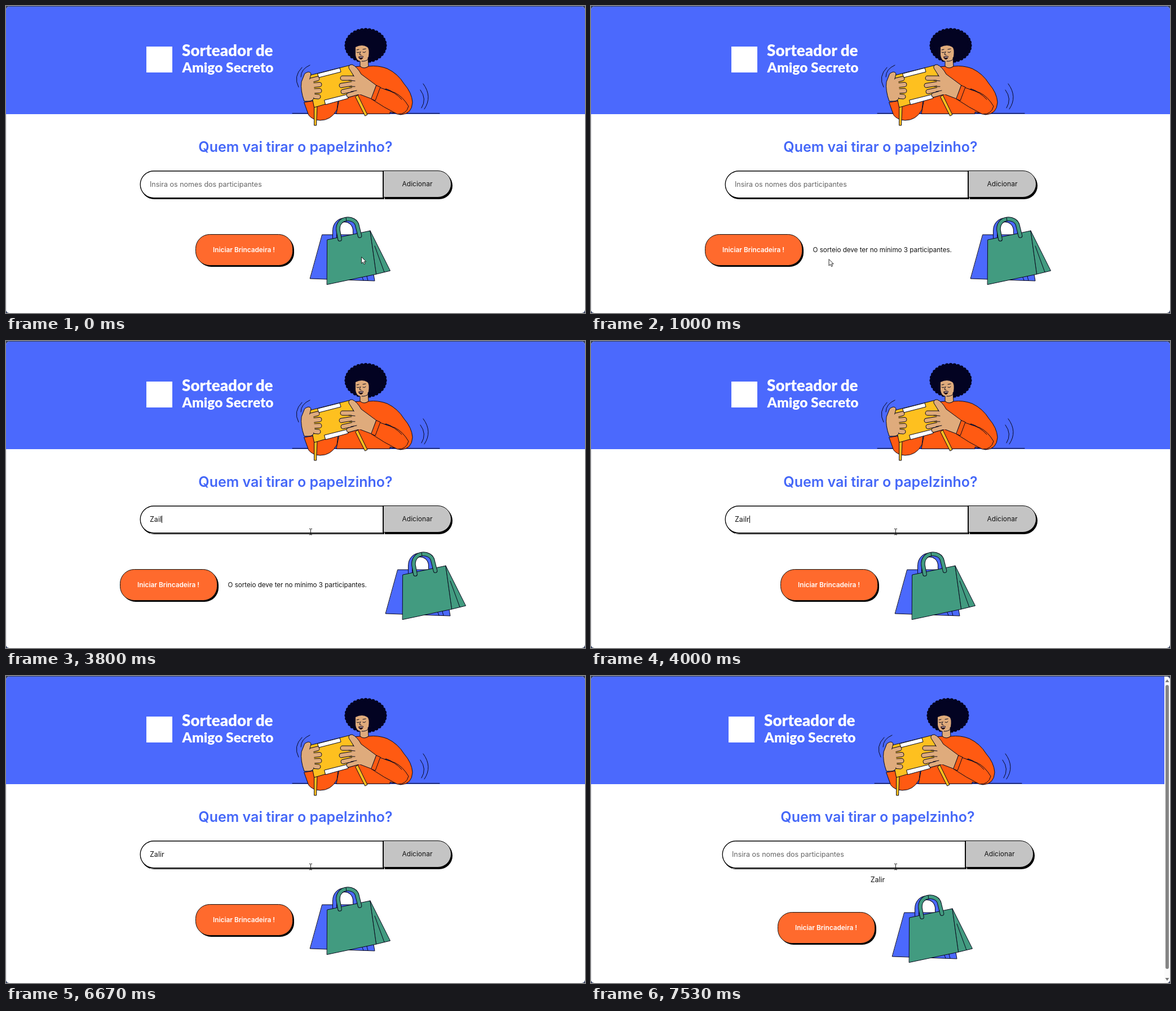
An HTML page that plays this animation: 1027 by 545 pixels, repeating every 8000 ms.

```html
<!DOCTYPE html>
<html lang="pt-BR">
<head>
<meta charset="utf-8">
<title>Sorteador</title>
<style>
  html, body { margin: 0; width: 100%; height: 100%; overflow: hidden; background: #34405f; }
  svg { display: block; width: 1027px; height: 545px; }
  text { font-family: Inter, sans-serif; white-space: pre; }
  .brand { font-family: Lato, sans-serif; font-weight: 900; fill: #fff; }
  .ink { stroke: #08081c; stroke-width: 1; stroke-linejoin: round; stroke-linecap: round; }
  .line { fill: none; }
  .skin { fill: #dfab7c; }
  .orange { fill: #ff5a12; }
  .yellow { fill: #fec01f; }
  .green { fill: #429b80; }
  .blue { fill: #4b69fd; }
  .white { fill: #fff; }
</style>
</head>
<body>
<svg viewBox="0 0 1027 545">
  <defs><clipPath id="window"><rect y="1" width="1027" height="544" rx="6"/></clipPath></defs>
  <g clip-path="url(#window)">
    <rect class="white" width="1027" height="545"/>
    <rect class="blue" width="1027" height="192"/>
    <rect y="192" width="1" height="353" fill="#e4e4e8"/>

    <g id="content">
      <rect class="white" x="249" y="72" width="46" height="46"/>
      <text class="brand" x="312" y="89" font-size="27.8">Sorteador de</text>
      <text class="brand" x="312.500" y="118" font-size="24.5">Amigo Secreto</text>

      <g id="woman"></g>

      <text x="513.5" y="259" text-anchor="middle" font-size="25" font-weight="600" fill="#4467f8">Quem vai tirar o papelzinho?</text>

      <path d="M671 295H263A24 24 0 0 0 263 343H671Z"/>
      <path id="focus" d="M255 341.500H669" stroke="#b5b5b5" stroke-width=".8"/>
      <path d="M669 293H262A23.800 23.800 0 0 0 262 340.600H669Z" fill="#fff" stroke="#000" stroke-width="1.300"/>
      <path d="M672 295H768A24 24 0 0 1 768 343H672Z"/>
      <path d="M669.500 292.500H766A23.500 23.500 0 0 1 766 339.500H669.500Z" fill="#c4c4c4" stroke="#000"/>
      <path d="M669 292.500V341.500" stroke="#000" stroke-width="1.600"/>
      <text x="729.500" y="320" text-anchor="middle" font-size="12" fill="#111">Adicionar</text>
      <text id="entry" x="255" y="320.500" font-size="12.5"></text>
      <rect id="caret" y="310" width="1" height="13" fill="#111"/>
      <text id="added" x="513.5" y="366" text-anchor="middle" font-size="12.5" fill="#111">Zalir</text>

      <g id="footer">
        <g id="start">
          <rect x="339" y="408" width="172" height="55" rx="25"/>
          <rect id="startFill" x="336.500" y="405.500" width="172" height="55" rx="25" stroke="#111"/>
          <text x="422" y="436.500" text-anchor="middle" font-size="11.8" font-weight="600" fill="#fff">Iniciar Brincadeira !</text>
        </g>
        <text id="warning" x="393.500" y="436.500" font-size="11.6" fill="#111">O sorteio deve ter no mínimo 3 participantes.</text>
        <g id="bags"></g>
      </g>
    </g>

    <g id="scrollbar">
      <rect x="1017" width="10" height="545" fill="#fafafa"/>
      <rect x="1019" y="16" width="6" height="504" rx="3" fill="#858585"/>
      <path d="M1018.500 11L1022 6L1025.500 11ZM1018.500 536L1022 541L1025.500 536Z" fill="#777"/>
    </g>

    <g id="cursor">
      <path id="arrow" d="M0 0V11.500L2.700 9L4.500 13L6.500 12.100L4.700 8.300H8.200Z" fill="#fff" stroke="#111" stroke-width=".9"/>
      <path id="hand" d="M-1 6V1Q0-1 1 1V5L6 6.500Q7.500 7 7 9L6 14H0L-4 9Q-4 7-2 8L-1 9Z" fill="#fff" stroke="#111" stroke-width=".9"/>
      <path id="beam" d="M-2.500-5H-.7L0-4.300L.7-5H2.500M0-4.300V4.800M-2.500 5.500H-.7L0 4.800L.7 5.500H2.500" fill="none" stroke="#111"/>
    </g>
  </g>
</svg>

<script>
const LOOP = 8000;
const $ = id => document.getElementById(id);
const shape = (d, fill) => `<path class="ink ${fill}" d="${d}"/>`;
const lines = d => shape(d, 'line');
// A rounded band with a dark outline on both sides.
const tube = (d, color, width) =>
  [['#08081c', width + 2], [color, width]].map(([stroke, w]) =>
    `<path d="${d}" fill="none" stroke="${stroke}" stroke-width="${w}" stroke-linecap="round" stroke-linejoin="round"/>`).join('');
const fingers = list => list.map(d => tube(d, '#dfab7c', 6.8)).join('');

function drawHair() {
  let curls = '<ellipse cx="638" cy="70" rx="35.5" ry="29"/>';
  const count = 32;
  for (let i = 0; i < count; i++) {
    const a = i / count * Math.PI * 2;
    curls += `<circle cx="${638 + 34 * Math.cos(a)}" cy="${70 + 27.5 * Math.sin(a)}" r="3.6"/>`;
  }
  return `<g fill="#030322">${curls}</g>`;
}

$('woman').innerHTML =
  lines('M508 190.500H769M525 109Q509 125 519 144M539 105Q523 112 523 126M735 149Q747 165 737 181M740 138Q757 161 742 183') +
  drawHair() +
  shape('M628 92V107Q634 114 643 107L642 92Z', 'skin') +
  shape('M586 191L592 160L612 110Q620 107 628 107Q635 113 643 107Q660 105 676 111Q695 120 706 138Q720 154 721 171Q720 192 700 193L681 188V191Z', 'orange') +
  shape('M674 147Q690 152 698 165Q686 160 675 153Z', 'blue') +
  '<path class="skin" d="M620 73Q632 67 641 73Q645 76 643 90Q637 100 629 98Q621 97 620 87Z"/>' +
  lines('M622 78L626 77M633 77L638 76M622 82Q624 84 627 82M633 82Q636 84 638 81M629 81L627 86L630 87M643 94Q638 99 631 98') +
  '<path d="M625 90Q630 88 634 89Q633 95 629 95Q626 94 625 90Z" fill="#260916"/><path d="M627 91L633 90.500" stroke="#fff" stroke-width="1.200"/>' +
  shape('M529 171L548 168L590 160L587 184Q577 203 557 203Q543 202 537 194Z', 'orange') +
  shape('M547 179L552 178L550.500 212H547Z', 'yellow') +
  shape('M620 161L624 158L641 193L637 195Z', 'yellow') +
  shape('M535 124L611 105L625 157L547 180Z', 'yellow') +
  shape('M553 120L592 110L594 117L555 127Z', 'white') +
  shape('M565 167L605 157L607 164L567 175Z', 'white') +
  shape('M655 142L690 154Q704 161 714 178Q710 193 694 192Q670 180 648 165Z', 'orange') +
  lines('M672 148Q690 152 702 166') +
  fingers(['M540 132L552 129', 'M541 141L556 139.500', 'M541 151L556 150.500', 'M542 160L554 161']) +
  shape('M530 120Q538 114 541 120Q540 126 538 132L541 144L546 164Q543 169 537 169L529 169Q522 150 524 135Z', 'skin') +
  '<path class="skin" d="M536 130L545 131L548 162L538 164Z"/>' +
  fingers(['M621 128L597 128', 'M620 137L595 141', 'M621 147L598 152', 'M626 153L608 158']) +
  shape('M618 126L608 110Q607 104 614 104Q623 108 630 121L657 141L649 165L628 157L617 148Z', 'skin') +
  '<path class="skin" d="M613 126L624 124L634 157L624 157L614 149Z"/>' +
  lines('M608 132L619 133M609 143L619 143M612 152L622 150') +
  shape('M657 141L664 144L655 168L648 165Z', 'orange');

$('bags').innerHTML =
  shape('M561 406H640L654 488L539.500 484Z', 'blue') +
  tube('M583 411V399C583 375 616 373 619 397V403', '#4b69fd', 6) +
  shape('M570 415L646 399L657 476L569.500 494.500Z', 'green') +
  shape('M646 399L681.500 470L657 476Z', 'green') +
  lines('M654 426L671 472.500M640 480L642 487.500M632 482L634 487') +
  tube('M592 414L589 398C587 373 620 373 623 390L627.500 408', '#429b80', 5.600) +
  lines('M603 375.500L604 382');

// [time, typed text]
const typing = [
  [0, ''], [3000, 'Z'], [3470, 'Za'], [3670, 'Zai'], [3800, 'Zail'], [4000, 'Zailr'],
  [4330, 'Zail'], [4470, 'Zai'], [4670, 'Za'], [4730, 'Zal'], [4870, 'Zali'],
  [5000, 'Zalir'], [5130, 'Zalir '], [5930, 'Zalir  '], [6870, '']
];
const caretOn = [[2530, 5670], [5930, 6470], [7000, 7530]];
const within = (t, [from, to]) => t >= from && t < to;
const show = (id, on) => { $(id).style.display = on ? '' : 'none'; };
const move = (id, x, y = 0) => $(id).setAttribute('transform', `translate(${x} ${y})`);

// Share of a move made so far, in equal time steps of 1/15 s.
function stepped(t, start, count) {
  const done = Math.floor((t - start + 4) / (1000 / 15)) + 1;
  return Math.max(0, Math.min(1, done / count));
}
const smooth = p => p * p * (3 - 2 * p);

function cursorAt(t) {
  if (t >= 2200) return [540.5, 338.5];
  if (t >= 2130) return [539.5, 339.5];
  if (t >= 1270) {
    const p = smooth(stepped(t, 1270, 13));
    return [422 + 115.5 * p, 449.5 - 109 * p];
  }
  const p = smooth(stepped(t, 70, 7));
  return [630.5 - 208.5 * p, 445.5 + 4 * p + 32 * Math.sin(Math.PI * p)];
}

function render(t) {
  const warned = within(t, [1000, 4000]);
  const listed = t >= 6870;
  const spread = warned ? 134 : 0;

  move('content', listed ? -5 : 0);
  move('footer', 0, listed ? 14 : 0);
  move('start', -spread);
  move('bags', spread);
  show('warning', warned);
  show('added', listed);
  show('scrollbar', listed);
  show('focus', t >= 2530);

  const typed = typing.findLast(([at]) => t >= at)[1];
  const entry = $('entry');
  entry.textContent = typed || 'Insira os nomes dos participantes';
  entry.setAttribute('fill', typed ? '#111' : '#666');
  const width = typed ? entry.getComputedTextLength() : 0;
  $('caret').setAttribute('x', Math.round(255 + width));
  show('caret', caretOn.some(span => within(t, span)));

  const [x, y] = cursorAt(t);
  const hover = t < 1000 && x > 337 && x < 509 && y > 406 && y < 461;
  const beam = t > 1270 && y < 341;
  move('cursor', x, y);
  show('hand', hover);
  show('beam', beam);
  show('arrow', !hover && !beam);
  $('startFill').setAttribute('fill', hover ? '#e95a1e' : '#ff6a2d');
}

const origin = performance.now();
function tick() {
  render((performance.now() - origin) % LOOP);
  requestAnimationFrame(tick);
}
tick();
</script>
</body>
</html>
```
